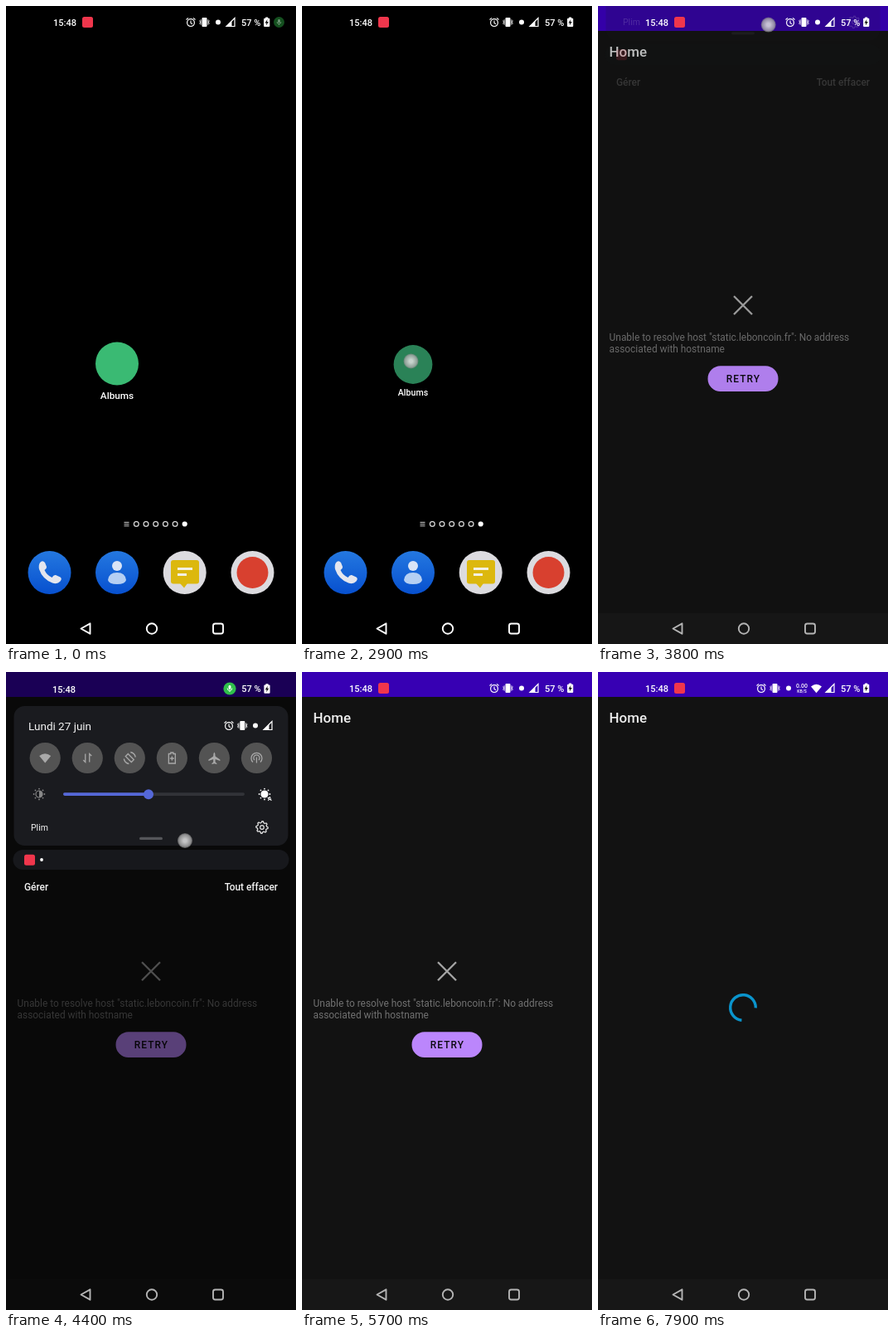
Write an HTML page with a canvas that moves like this. It is 350x768 px and loops after 8000 ms.

```html
<!DOCTYPE html>
<html lang="fr">
<head>
<meta charset="utf-8">
<style>
  html, body { margin: 0; width: 100%; height: 100%; overflow: hidden; background: #000; }
  canvas { display: block; }
</style>
</head>
<body>
<canvas id="stage" width="350" height="768"></canvas>
<script>
const ctx = document.getElementById('stage').getContext('2d');
const LOOP = 8000, STEP = 100, TAU = Math.PI * 2;

const clamp = v => Math.min(1, Math.max(0, v));
const ramp = (t, from, to) => clamp((t - from) / (to - from));
const smooth = v => v * v * (3 - 2 * v);
const mix = (a, b, p) => a + (b - a) * p;
const within = (t, from, to) => t >= from && t < to;

function group(draw, { x = 0, y = 0, scale = 1, alpha = 1 } = {}) {
  if (alpha <= 0) return;
  ctx.save();
  ctx.translate(x, y);
  ctx.scale(scale, scale);
  ctx.globalAlpha *= alpha;
  draw();
  ctx.restore();
}
function box(x, y, w, h, r, fill) {
  ctx.beginPath();
  ctx.roundRect(x, y, w, h, r);
  ctx.fillStyle = fill;
  ctx.fill();
}
function disc(x, y, r, fill) {
  ctx.beginPath();
  ctx.arc(x, y, r, 0, TAU);
  ctx.fillStyle = fill;
  ctx.fill();
}
function arc(x, y, r, color, width, from = 0, to = TAU) {
  ctx.beginPath();
  ctx.arc(x, y, r, from, to);
  ctx.strokeStyle = color;
  ctx.lineWidth = width;
  ctx.stroke();
}
function line(path, color, width) {
  ctx.strokeStyle = color;
  ctx.lineWidth = width;
  ctx.stroke(new Path2D(path));
}
function shape(path, fill) {
  ctx.fillStyle = fill;
  ctx.fill(new Path2D(path));
}
function text(str, x, y, size, color, { weight = 400, align = 'left', spacing = 0 } = {}) {
  ctx.font = `${weight} ${size}px Roboto, sans-serif`;
  ctx.textAlign = align;
  ctx.letterSpacing = spacing + 'px';
  ctx.fillStyle = color;
  ctx.fillText(str, x, y);
}
function vertical(y0, y1, top, bottom) {
  const g = ctx.createLinearGradient(0, y0, 0, y1);
  g.addColorStop(0, top);
  g.addColorStop(1, bottom);
  return g;
}

// Status bar
const icon = {
  alarm() {
    arc(0, 0.6, 4.4, '#fff', 1.2);
    line('M0-2V1L2 2.3M-5.5-3L-3-5.2M5.5-3L3-5.2', '#fff', 1.1);
  },
  vibrate() {
    box(-3, -5.5, 6, 11, 1, '#fff');
    line('M-4.4-3.2V3.2M4.4-3.2V3.2M-5.8-2L-5 0L-5.8 2M5.8-2L5 0L5.8 2', '#fff', 0.9);
  },
  link() { disc(0, 0, 3, '#fff'); },
  signal() {
    line('M-5 5H5V-5Z', '#fff', 1.2);
    shape('M-5.5 5.5H1.5V-1.5Z', '#fff');
  },
  wifi() { shape('M0 5.5L-6.5-2.4Q0-7.6 6.5-2.4Z', '#fff'); },
  battery() {
    box(-3.6, -4.8, 7.2, 10.4, 1, '#fff');
    box(-1.6, -6, 3.2, 2, 0.4, '#fff');
    shape('M.8-3.4L-2.2 1H-.3L-.8 4L2.2-.4H.3Z', '#111');
  }
};
const put = (name, x, y) => group(icon[name], { x, y });

function recorder(x, y) { box(x, y, 13, 13, 2.5, '#f0364c'); }

function micChip(x, y, r) {
  disc(x, y, r, '#2fbf4b');
  const s = r / 7.5;
  group(() => {
    box(-1.4, -4, 2.8, 5, 1.4, '#fff');
    line('M-2.8-.5Q-2.8 2.4 0 2.4Q2.8 2.4 2.8-.5M0 2.4V4', '#fff', 0.9);
  }, { x, y, scale: s });
}
function percent(dx) {
  text('57 %', 293 + dx, 23.7, 11, '#fff', { weight: 500 });
  put('battery', 323.7 + dx, 19.5);
}
function statusBar(dx, online) {
  text('15:48', 57, 23.7, 11, '#fff', { weight: 500 });
  recorder(92, 13);
  const left = dx - (online ? 35 : 0);
  put('alarm', 232 + left, 19.5);
  put('vibrate', 248.5 + left, 19.5);
  put('link', 265 + left, 19.5);
  if (online) {
    text('0.00', 246, 19.4, 7, '#fff', { weight: 500, align: 'center' });
    text('KB/S', 246, 25, 5, '#fff', { weight: 500, align: 'center' });
    put('wifi', 263.5, 19.8);
  }
  put('signal', 280 + dx, 19.5);
  percent(dx);
}
function navButtons(color) {
  ctx.lineJoin = 'round';
  line('M90.5 749.5L101.5 743.3V755.7Z', color, 1.9);
  arc(176, 749.5, 6.2, color, 1.9);
  ctx.beginPath();
  ctx.roundRect(250, 743.5, 12, 12, 2.5);
  ctx.stroke();
  ctx.lineJoin = 'miter';
}
function touch(x, y, r = 9) {
  const g = ctx.createRadialGradient(x, y, 2, x, y, r);
  g.addColorStop(0, 'rgba(225,225,225,.85)');
  g.addColorStop(0.75, 'rgba(170,170,170,.8)');
  g.addColorStop(1, 'rgba(130,130,130,.6)');
  disc(x, y, r, g);
}

// Launcher
function launcher(pressed) {
  group(() => {
    disc(0, 0, 26, pressed ? '#2a8257' : '#3aba73');
    text('Albums', 0, 42, 11.8, '#fff', { weight: 500, align: 'center' });
  }, { x: 134, y: pressed ? 431.5 : 430.5, scale: pressed ? 0.9 : 1 });

  line('M142.5 621.5H148.5M142.5 623.7H148.5M142.5 625.9H148.5', '#ccc', 1);
  for (let i = 0; i < 5; i++) arc(157.3 + i * 11.7, 623.5, 2.9, '#ddd', 1.2);
  disc(215.7, 623.5, 3.1, '#fff');

  const blue = vertical(656, 708, '#2478e0', '#0750cf');
  disc(52.5, 682, 26, blue);
  shape('M41 670Q44 666.5 47 670L49 675Q49.5 677 46.5 679Q49 685 55.5 688Q57.5 684.5 60 685L65.5 687.5Q68 689.5 65.5 692.5Q62 696.5 56 694.5Q44 690 40 678Q39 673 41 670Z', '#e4e6ee');

  disc(134, 682, 26, blue);
  disc(134, 674, 6, '#d9e4f6');
  shape('M123 691Q124 682 134 682Q144 682 145 691Q144 696 134 696Q124 696 123 691Z', '#b5cff3');

  disc(215.7, 682, 26, '#dcdbdf');
  box(199, 667, 34, 28.5, 3, '#dcb80e');
  shape('M210 695L215 700.5L219 695Z', '#dcb80e');
  line('M207 677.5H225M207 684.5H218', '#f3f0e4', 3);

  disc(297.5, 682, 26, '#dcdbdf');
  disc(297.5, 682, 19, '#d8402f');
}

// App
function spinner(t) {
  const grow = smooth(ramp(t, 7400, 7960));
  const head = mix(75, 371, grow), tail = mix(70, 96, ramp(t, 7400, 7900));
  const rad = Math.PI / 180;
  arc(175, 404, 15.3, '#0a94cc', 3.4, tail * rad, head * rad);
}
function errorView(t) {
  line('M164 349.3L186 371.3M186 349.3L164 371.3', '#a5a5a5', 2.3);
  text('Unable to resolve host "static.leboncoin.fr": No address', 13.6, 402.6, 11.9, '#717171');
  text('associated with hostname', 13.6, 416.5, 11.9, '#717171');
  box(132.5, 433.3, 85, 30.8, 15.4, '#bb86fc');
  if (within(t, 7200, 7500)) {
    ctx.save();
    ctx.clip();
    disc(182, 449, mix(15, 50, ramp(t, 7200, 7400)), 'rgba(255,255,255,.22)');
    ctx.restore();
  }
  text('RETRY', 154.8, 453.3, 11.9, '#0c0a10', { weight: 500, spacing: 1.06 });
}
function app(t) {
  box(0, 0, 350, 768, 0, '#121212');
  box(0, 731, 350, 37, 0, '#171717');
  box(0, 0, 350, 30, 0, '#3700b3');
  text('Home', 13.6, 60.5, 16.9, '#eee', { weight: 500 });
  if (t >= 7500) spinner(t);
  else if (t >= 3400) errorView(t);
}

// Notification shade
const tileIcons = [
  'M0 6L-7-2.5Q0-8 7-2.5Z',
  'M-2.5-5V5L-5 2.5M2.5 5V-5L5-2.5',
  'M-2-5L5 2L2 5L-5-2ZM1-7Q6-6 7-1M-1 7Q-6 6-7 1',
  'M-4-5H-1.5V-6.5H1.5V-5H4V6.5H-4ZM0-2V3M-2.5.5H2.5',
  'M0-7Q1.2-6 1.2-2L7 2V3.5L1.2 1.5V5L3 6.5V7.5L0 6.7L-3 7.5V6.5L-1.2 5V1.5L-7 3.5V2L-1.2-2Q-1.2-6 0-7Z',
  'M-4.5 5A6.5 6.5 0 1 1 4.5 5M-2.5 2.5A3.6 3.6 0 1 1 2.5 2.5M0-1V6'
];
const solidTiles = [0, 4];

function sun(x, y, r, color) {
  arc(x, y, r, color, 1.2);
  for (let i = 0; i < 8; i++) {
    const a = i * TAU / 8;
    disc(x + Math.cos(a) * 6.4, y + Math.sin(a) * 6.4, 0.9, color);
  }
}
function gear(x, y) {
  ctx.beginPath();
  for (let i = 0; i < 32; i++) {
    const r = i % 4 < 2 ? 7.2 : 5.6, a = i * TAU / 32;
    ctx.lineTo(x + Math.cos(a) * r, y + Math.sin(a) * r);
  }
  ctx.closePath();
  ctx.strokeStyle = '#e4e4e4';
  ctx.lineWidth = 1.3;
  ctx.stroke();
  arc(x, y, 2.3, '#e4e4e4', 1.2);
}
function shade(wifiOn) {
  box(9.5, 41, 331, 168, 13, '#1a1b1f');
  text('Lundi 27 juin', 27, 69.7, 13.5, '#f2f2f2');
  put('alarm', 269, 64.5);
  put('vibrate', 285.3, 64.5);
  put('link', 301, 64.5);
  put('signal', 316, 64.5);

  tileIcons.forEach((path, i) => group(() => {
    const on = i === 0 && wifiOn;
    disc(0, 0, 18.6, on ? '#5568d8' : '#535353');
    if (solidTiles.includes(i)) shape(path, on ? '#fff' : '#a9a9a9');
    else line(path, '#a9a9a9', 1.3);
  }, { x: 47.2 + i * 51.05, y: 103.5 }));

  sun(40, 147, 4, '#888');
  shape('M40 143A4 4 0 0 1 40 151Z', '#888');
  box(69, 145.3, 219, 3.6, 1.8, '#323338');
  box(69, 145.3, 103, 3.6, 1.8, '#5568d8');
  disc(172, 147.2, 6, '#5568d8');
  sun(312, 147, 4, '#fff');
  disc(312, 147, 4, '#fff');
  text('A', 316, 155, 7, '#fff', { weight: 700 });

  text('Plim', 30, 190.8, 10.5, '#f2f2f2');
  gear(309, 187);
  box(161, 198.8, 28, 3.2, 1.6, '#55565a');

  box(8.5, 214, 333, 24, 12, '#17181c');
  recorder(22, 219.7);
  disc(43, 226, 1.9, '#fff');
  const strong = { weight: 500 };
  text('Gérer', 22, 263.2, 11.9, '#f2f2f2', strong);
  text('Tout effacer', 328, 263.2, 11.9, '#f2f2f2', { ...strong, align: 'right' });
}

// Scenes
function homeScene(t) {
  const chip = mix(0.42, 1, ramp(t, 0, 400)) * (1 - ramp(t, 1200, 1500));
  const dx = mix(-9, 0, smooth(ramp(t, 1300, 1700)));
  group(() => launcher(t >= 2900), { alpha: 1 - ramp(t, 2950, 3150) });
  if (t === 2900) touch(131.5, 427.5);

  if (t >= 3000) {
    const px = 1 - (1 - ramp(t, 2962, 3360)) ** 3;
    const py = 1 - (1 - ramp(t, 2980, 3365)) ** 3;
    const x = mix(108, 0, px), y = mix(405, 0, py);
    group(() => box(x, y, mix(160, 350, px) - x, mix(457, 768, py) - y, mix(26, 48, px), '#141414'),
      { alpha: ramp(t, 2900, 3100) });
  }
  statusBar(dx, false);
  group(() => micChip(329.5, 19.5, 6.5), { alpha: chip });
  navButtons('#fff');
}
function appScene(t) {
  const open = smooth(ramp(t, 3650, 4350)) * (1 - smooth(ramp(t, 5150, 5550)));
  app(t);
  group(() => box(0, 0, 350, 768, 0, '#000'), { alpha: open * 0.52 });
  group(() => shade(t >= 5000), { y: (open - 1) * 190, alpha: clamp(open * 1.4) });

  const shadeHeader = within(t, 3900, 5500);
  if (shadeHeader) {
    text('15:48', 56, 24.7, 11, '#fff', { weight: 500 });
    micChip(270, 20, 7.6);
    group(() => percent(-8.7), { y: 0.7 });
  } else {
    group(() => statusBar(0, t >= 7000), { alpha: t < 5500 ? 1 : mix(0.4, 1, ramp(t, 5500, 5700)) });
  }
  navButtons('#b4b4b4');

  if (within(t, 3700, 4500)) {
    const p = ramp(t, 3700, 4400);
    touch(mix(204, 216, p), mix(12, 203, smooth(p)));
  } else if (within(t, 4900, 5100)) touch(47, 105);
  else if (within(t, 5200, 5600)) {
    const p = ramp(t, 5200, 5500);
    touch(mix(258, 273, p), mix(590, 325, p));
  } else if (within(t, 7200, 7400)) touch(182, 449);
}

const start = performance.now();
function frame() {
  const elapsed = (performance.now() - start) % LOOP;
  const t = Math.floor(elapsed / STEP) * STEP;
  ctx.fillStyle = '#000';
  ctx.fillRect(0, 0, 350, 768);
  (t < 3300 ? homeScene : appScene)(t);
  requestAnimationFrame(frame);
}
frame();
</script>
</body>
</html>
```
